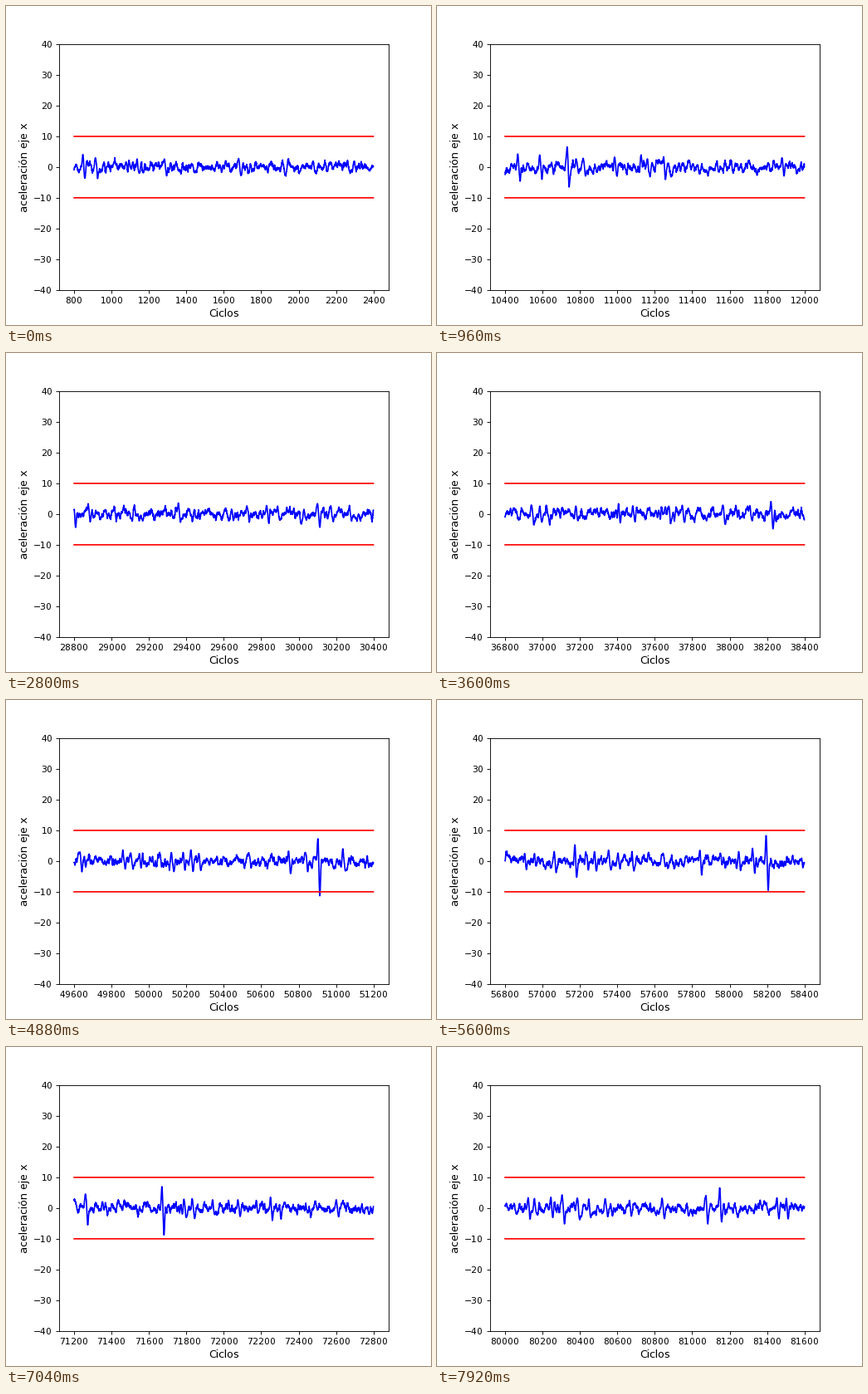
A matplotlib script that plays this animation: 512 by 384 pixels, repeating every 8000 ms.

```python
import numpy as np
import matplotlib.pyplot as plt
from matplotlib.animation import FuncAnimation

plt.rcParams["text.hinting_factor"] = 1  # whole-pixel glyph advances

FRAMES, INTERVAL = 100, 80
START, STEP, WINDOW = 800, 800, 1600
TOTAL = START + STEP * FRAMES + WINDOW
LIMIT = 10

# The strongest shocks: cycle, rise, dip
MAIN_SHOCKS = [
    (10732, 6.8, -6.5), (20987, 6.6, -9.3), (21532, 7.5, -6),
    (21836, 8.6, -10), (50903, 7.6, -11.3), (63502, 5, -7.7),
    (63660, 7.6, -11.7), (81147, 6.8, -4.5),
]


def smooth_noise(rng, width, std):
    t = np.arange(-4 * width, 4 * width + 1)
    kernel = np.exp(-(t / width) ** 2 / 2)
    noise = np.convolve(rng.normal(size=TOTAL), kernel, "same")
    return noise * std / noise.std()


def pull(signal, cycle, value, width=3.5):
    """Bend the signal smoothly through value around the given cycle."""
    t = np.arange(max(int(cycle) - 20, 0), min(int(cycle) + 21, TOTAL))
    weight = np.exp(-((t - cycle) / width) ** 2 / 2)
    signal[t] += weight * (value - signal[t])


def add_shock(signal, cycle, rise, dip, gap=10):
    pull(signal, cycle, rise)
    pull(signal, cycle + gap, dip)


def make_signal():
    rng = np.random.default_rng(12)
    signal = smooth_noise(rng, 3, 0.95) + rng.normal(0, 0.3, TOTAL)

    cycle = START
    while cycle < TOTAL - 60:
        cycle += 40 + rng.exponential(130)
        rise = min(2.5 + rng.exponential(1), 9.5)
        dip = -rise * rng.uniform(0.7, 1.25)
        add_shock(signal, cycle, rise, dip, rng.uniform(9, 14))

    for shock in MAIN_SHOCKS:
        add_shock(signal, *shock)
    return signal


signal = make_signal()

fig, ax = plt.subplots(figsize=(6.4, 4.8), dpi=80)
ax.set_ylim(-40, 40)
ax.set_xlabel("Ciclos", fontsize=12)
ax.set_ylabel("aceleración eje x", fontsize=12)
trace, = ax.plot([], [], color="b")
bounds = [ax.plot([], [], color="r")[0] for _ in range(2)]


def update(i):
    start = START + STEP * i
    cycles = np.arange(start, start + WINDOW)
    trace.set_data(cycles, signal[cycles])
    for line, level in zip(bounds, (LIMIT, -LIMIT)):
        line.set_data(cycles, np.full(WINDOW, level))
    margin = 0.05 * WINDOW
    ax.set_xlim(start - margin, start + WINDOW + margin)
    return [trace, *bounds]


anim = FuncAnimation(fig, update, frames=FRAMES, interval=INTERVAL,
                     init_func=lambda: update(0), repeat=True, repeat_delay=0)
plt.show()
```
